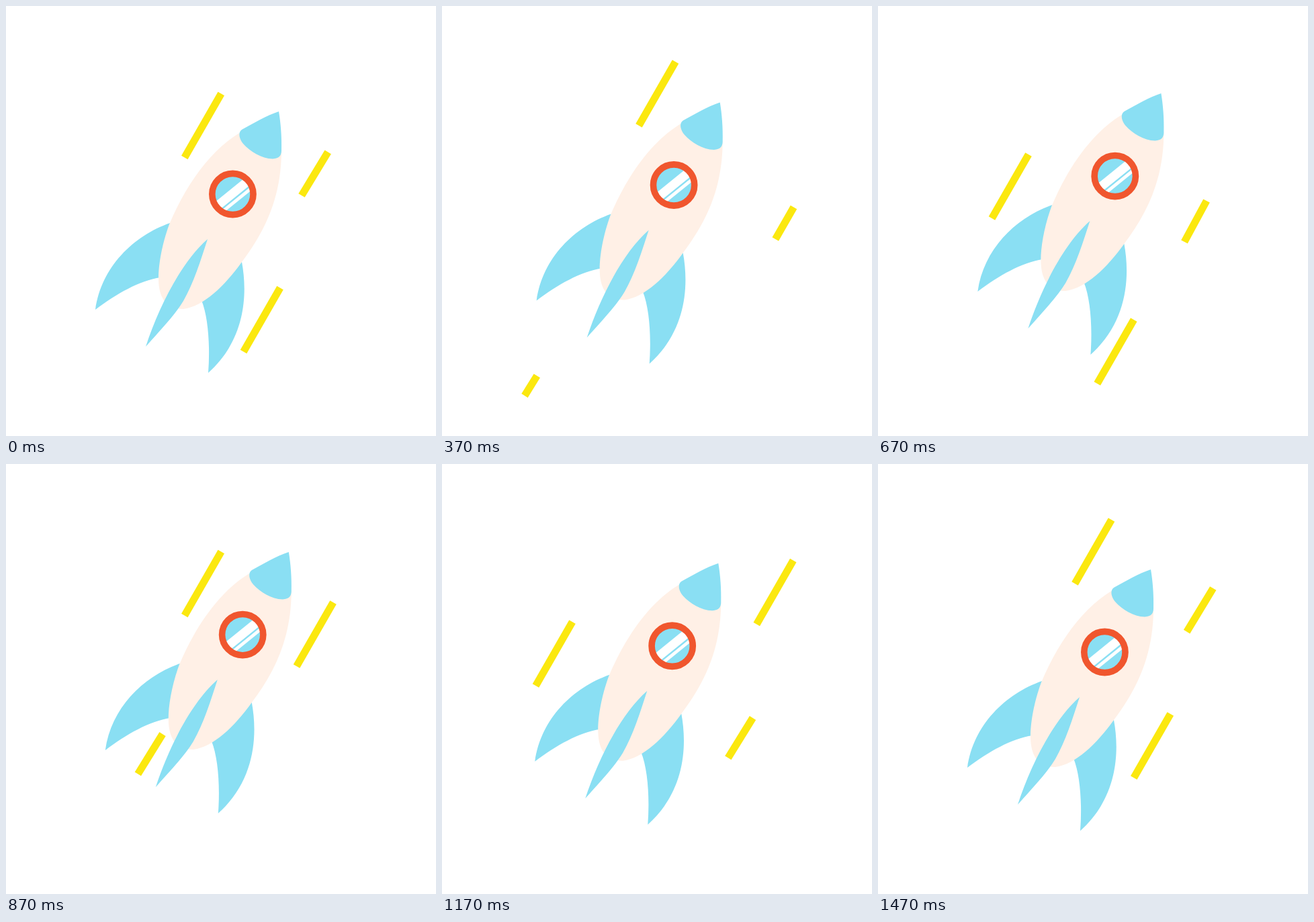
An HTML page that plays this animation: 640 by 640 pixels, repeating every 1.53 s.

```html
<!DOCTYPE html>
<html lang="en">
<head>
<meta charset="utf-8">
<title>Rocket</title>
<style>
  html, body { margin: 0; width: 100%; height: 100%; overflow: hidden; background: #fff; }
  svg { display: block; width: 100vw; height: 100vh; }
  .blue { fill: #8adff3; }
  .cream { fill: #fff0e6; }
  .white { fill: #fff; }
  .ring { fill: none; stroke: #f0562e; stroke-width: 9.6; }
  .streak { stroke: #fbe80f; stroke-width: 11; }
</style>
</head>
<body>
<svg viewBox="0 0 640 640">
  <defs>
    <clipPath id="pane"><circle r="27"/></clipPath>
  </defs>
  <g id="back"></g>
  <g id="rocket">
    <path class="blue" d="M244 323C190 342 142 388 133 452C165 428 198 409 230 404L260 380Z"/>
    <path class="blue" d="M351 381C360 430 356 497 301 546C304 505 301 463 291 438L320 390Z"/>
    <path class="cream" d="M349 188C306 213 268 265 243 325C232 355 227 385 227 405C227 430 235 451 264 451C294 447 325 417 351 381C385 336 410 285 410 215L380 185Z"/>
    <path class="blue" d="M406 157C388 163 369 174 351 184C345 188 347 198 353 205C364 217 380 227 397 227.5C407 227 410 222 410 215C410.5 195 409 175 406 157Z"/>
    <path class="blue" d="M300 347C262 380 228 446 208 507C232 480 252 459 264 439C279 413 290 378 300 347Z"/>
    <g transform="translate(337.4 280)">
      <circle class="blue" r="28"/>
      <g clip-path="url(#pane)">
        <g class="white" transform="rotate(-39)">
          <rect x="-40" y="-7.4" width="80" height="13.2"/>
          <rect x="-40" y="8.2" width="80" height="4.8"/>
        </g>
      </g>
      <circle class="ring" r="30.6"/>
    </g>
  </g>
  <g id="front"></g>
</svg>
<script>
  const LOOP = 1530, STEPS = 38, TICK = 100 / 3;
  const PARTS = 6, LAG = 2;          // a streak crosses its track in six parts
  const LONG = [-163.5, 285], SHORT = [-110, 178];

  // start point, travel, steps at which a streak sets off
  const tracks = [
    { at: [374.75, 35.5], by: LONG, starts: [6, 18, 34] },
    { at: [305.75, 78.5], by: LONG, starts: [1, 12] },
    { at: [248.5, 140], by: LONG, starts: [25] },
    { at: [514.25, 158.5], by: LONG, starts: [19] },
    { at: [445.5, 296], by: LONG, starts: [0] },
    { at: [489.75, 277], by: LONG, starts: [11, 33] },
    { at: [550, 96], by: LONG, starts: [26] },
    { at: [523.5, 299.5], by: LONG, starts: [8] },
    { at: [557.5, 88], by: [-117.5, 194], starts: [32] },
    { at: [522, 229], by: [-99, 183], starts: [13] },
    { at: [517.5, 289], by: SHORT, starts: [24] },
    { at: [233, 402], by: SHORT, starts: [2, 20] },
    { at: [431, 211], by: SHORT, starts: [2], layer: 'back' }
  ];

  const byId = id => document.getElementById(id);
  const rocket = byId('rocket');

  for (const track of tracks) {
    track.line = document.createElementNS('http://www.w3.org/2000/svg', 'line');
    track.line.setAttribute('class', 'streak');
    byId(track.layer || 'front').append(track.line);
  }

  const clamp = (v, lo, hi) => Math.min(hi, Math.max(lo, v));

  function ease(x) {
    x = clamp(x, 0, 1);
    const half = v => Math.pow(2 * v, 2.6) / 2;
    return x < 0.5 ? half(x) : 1 - half(1 - x);
  }

  // 25 steps a second, shown on a 30 Hz clock
  function stepAt(time) {
    const tick = Math.floor((time % LOOP + 3.4) / TICK);
    return clamp(Math.ceil(tick * 5 / 6 - 0.5), 0, STEPS - 1);
  }

  function drawTrack({ at, by, starts, line }, step) {
    const age = starts
      .map(start => (step - start + STEPS) % STEPS)
      .find(a => a > 0 && a < PARTS + LAG);
    line.style.display = age ? '' : 'none';
    if (!age) return;
    const put = (end, part) => {
      const u = clamp(part, 0, PARTS) / PARTS;
      line.setAttribute('x' + end, at[0] + by[0] * u);
      line.setAttribute('y' + end, at[1] + by[1] * u);
    };
    put(1, age - LAG);
    put(2, age);
  }

  function draw(time) {
    const step = stepAt(time);
    const lift = step <= 18 ? ease(step / 18) : ease((37 - step) / 18.5);
    rocket.setAttribute('transform', `translate(${15.4 * lift} ${-27 * lift})`);
    tracks.forEach(track => drawTrack(track, step));
  }

  const begin = performance.now();
  function loop() {
    draw(performance.now() - begin);
    requestAnimationFrame(loop);
  }
  loop();
</script>
</body>
</html>
```
